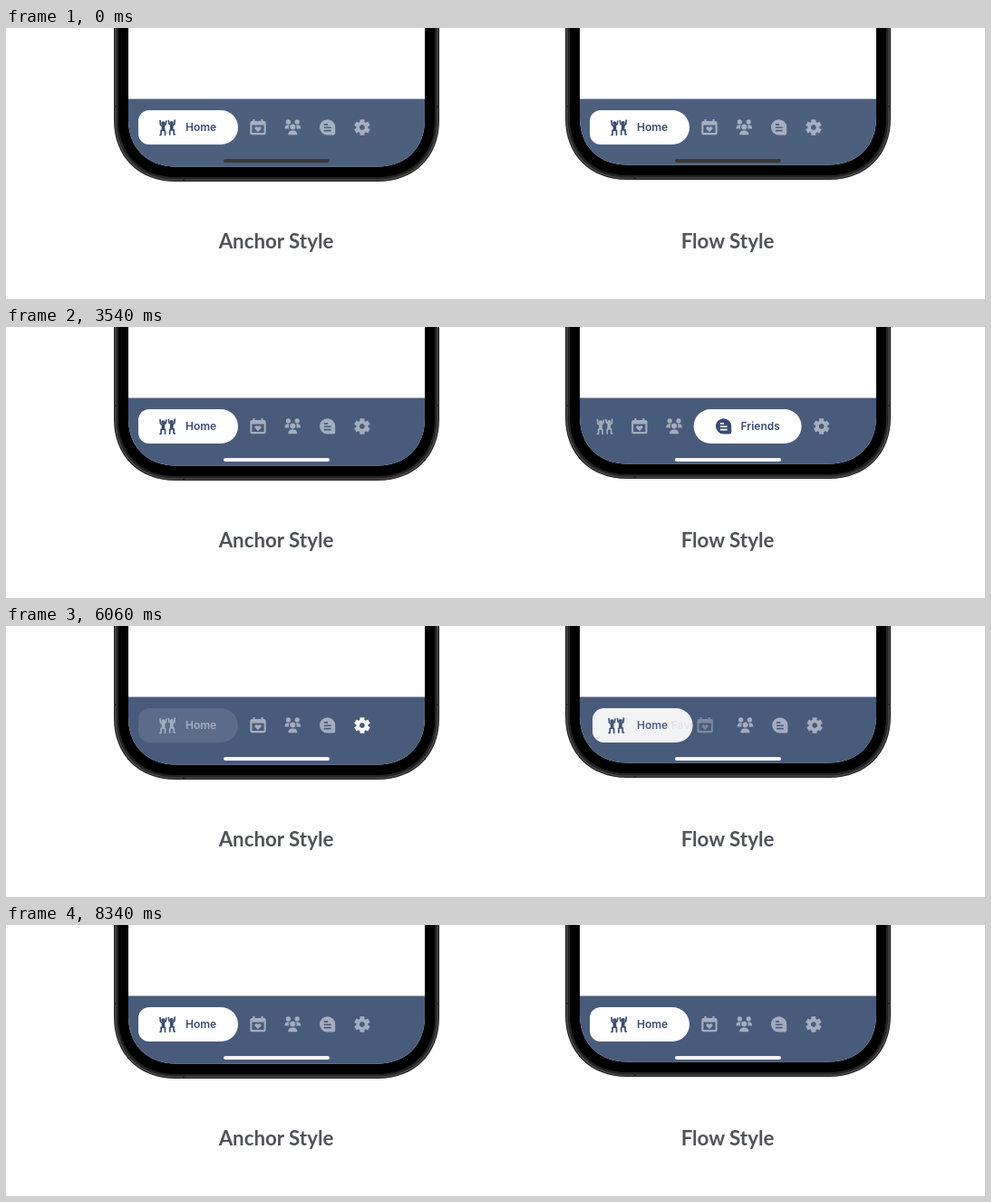
Write an HTML page that moves like this. It is 1080 by 300 pixels and loops after 8790 ms.

```html
<!DOCTYPE html>
<html lang="en">
<head>
<meta charset="utf-8">
<title>Tab bar styles</title>
<style>
html, body { margin: 0; width: 100%; height: 100%; overflow: hidden; background: #fff; }
svg { display: block; width: 100vw; height: 100vh; }
.label { font: 600 12px Inter, sans-serif; }
.caption { font: 700 22.3px Lato, sans-serif; fill: #50535a; text-anchor: middle; }
</style>
</head>
<body>
<svg id="stage" viewBox="0 0 1080 300"></svg>
<script>
const LOOP = 8790;
const NAMES = ['Home', 'Favorites', 'Messages', 'Friends', 'Profile'];
const PILL_WIDTHS = [110, 126, 133, 119, 113];
const STEP = 38.3;
const DARK = [57, 75, 112], LIGHT = [164, 174, 192];

const spokes = [0, 60, 120].map(a =>
  `<path d="M0-8.7V8.7" stroke-width="5" transform="rotate(${a})"/>`).join('');
const dancer = `<g fill="none" stroke="currentColor" stroke-width="1.7" stroke-linecap="round" stroke-linejoin="round">
  <path d="M-8-7.5L-7.6-3L-5-1.5L-1.8-3.5L-1.2-7"/><path d="M-7 3.5L-4.5 2.5L-2.5 4V8.3M-6.8 3.5L-7 8.2L-8 8.3"/></g>
  <path d="M-6.6-2H-2.8L-2.6 4H-6Z"/><circle cx="-4.6" cy="-4.7" r="2"/>`;
const ICONS = [
  `${dancer}<g transform="translate(.2 -.4) scale(-1 1)">${dancer}</g>`,
  `<path fill-rule="evenodd" d="M-5.5-9h2v2h7v-2h2v2H6.5a2.2 2.2 0 0 1 2.2 2.2V6a2.2 2.2 0 0 1-2.2 2.2H-6.5A2.2 2.2 0 0 1-8.7 6V-4.8A2.2 2.2 0 0 1-6.5-7h1ZM-6.6-2.6V6H6.6V-2.6Z"/>
   <path d="M0 5.2L-3.4 1.8C-4.6 0-1.8-2.2 0 .2C1.8-2.2 4.6 0 3.4 1.8Z"/>`,
  `<circle cx="-4.9" cy="-6.1" r="2.6"/><circle cx="4.9" cy="-6.1" r="2.6"/><circle cy="-.6" r="3"/>
   <path d="M-8.8 1.6C-8.8-1.4-7.5-2.7-5-2.7L-3.6-2.4C-4.6-.8-4.5.5-3.7 1.6ZM8.8 1.6C8.8-1.4 7.5-2.7 5-2.7L3.6-2.4C4.6-.8 4.5.5 3.7 1.6ZM-5 8.2C-5 4.8-3 3.4 0 3.4S5 4.8 5 8.2Z"/>`,
  `<path fill-rule="evenodd" d="M0-8.7A8.6 8.6 0 0 1 8.6-.1V6.7A1.8 1.8 0 0 1 6.8 8.5H0A8.6 8.6 0 0 1 0-8.7ZM-3.8-4V-2.3H.4V-4ZM-3.8-.6V1.1H4V-.6ZM-3.8 2.8V4.5H4V2.8Z"/>`,
  `<path fill-rule="evenodd" d="M0-6.6A6.6 6.6 0 0 1 0 6.6A6.6 6.6 0 0 1 0-6.6ZM0-3A3 3 0 0 0 0 3A3 3 0 0 0 0-3Z"/>
   <g stroke="currentColor" mask="url(#hub)">${spokes}</g>`
];

const clamp = v => Math.max(0, Math.min(1, v));
const lerp = (a, b, p) => a + (b - a) * p;
const mix = (a, b, p) => `rgb(${a.map((v, i) => Math.round(lerp(v, b[i], p)))})`;
const set = (el, attrs) => { for (const k in attrs) el.setAttribute(k, attrs[k]); };
const stage = document.getElementById('stage');

// Rounded rectangle open at the top, with bottom corners only
const tray = (l, r, top, bottom, rad) =>
  `M${l} ${top}V${bottom - rad}C${l} ${bottom - rad * .4} ${l + rad * .4} ${bottom} ${l + rad} ${bottom}` +
  `H${r - rad}C${r - rad * .4} ${bottom} ${r} ${bottom - rad * .4} ${r} ${bottom - rad}V${top}Z`;

const iconSet = layer => ICONS.map((d, i) => `<g data-${layer}="${i}" fill="currentColor">${d}</g>`).join('');

function phone(id, x, bottom, caption) {
  return `<g id="${id}">
    <path d="${tray(x - 16, x + 343, -10, bottom, 68)}" fill="#1b1b1c"/>
    <path d="${tray(x - 15, x + 342, -10, bottom - 1, 67)}" fill="#4a4a4b"/>
    <path d="${tray(x - 13.4, x + 340.4, -10, bottom - 2.6, 65.5)}" fill="#232324"/>
    <path d="${tray(x - 11, x + 338, -10, bottom - 5, 63)}"/>
    <path d="M${x - 16} 87h4M${x + 339} 87h4M${x + 61} ${bottom - 4}v3" stroke="#2a2a2b" stroke-width="2"/>
    <path d="${tray(x, x + 327, -10, bottom - 16.5, 52)}" fill="#fff"/>
    <path data-bar d="${tray(x, x + 327, 78.5, bottom - 16.5, 52)}"/>
    <rect data-indicator x="${x + 105}" y="145" width="117" height="4" rx="2"/>
    <g transform="translate(${x} 110)">
      ${iconSet('under')}
      <path data-pill fill="#fff"/>
      ${iconSet('over')}
      ${NAMES.map((n, i) => `<text class="label" data-label="${i}" x="${layout(i).left + 52}" y="4.3">${n}</text>`).join('')}
    </g></g>
    <text class="caption" x="${x + 163}" y="244">${caption}</text>`;
}

// Pill edges and icon centres while one tab is expanded
function layout(sel) {
  const left = sel ? 49 + STEP * (sel - 1) : 11;
  const width = PILL_WIDTHS[sel];
  const xs = NAMES.map((_, i) =>
    i < sel ? 27.5 + STEP * i :
    i === sel ? left + (sel ? 33 : 32) :
    left + width + 22 + STEP * (i - sel - 1));
  return { left, width, xs, radius: sel ? 19 : 12 };
}

function pillPath(l, w, rl) {
  const r = l + w;
  return `M${l + rl}-19H${r - 19}A19 19 0 0 1 ${r - 19} 19H${l + rl}A${rl} ${rl} 0 0 1 ${l} ${19 - rl}V${rl - 19}A${rl} ${rl} 0 0 1 ${l + rl}-19Z`;
}

stage.innerHTML = `<mask id="hub"><rect x="-12" y="-12" width="24" height="24" fill="#fff"/><circle r="3" fill="#000"/></mask>` +
  phone('anchor', 135, 170, 'Anchor Style') + phone('flow', 633, 168, 'Flow Style');

function parts(id) {
  const root = document.getElementById(id);
  const all = name => [...root.querySelectorAll(`[data-${name}]`)];
  return { under: all('under'), over: all('over'), labels: all('label'), pill: all('pill')[0] };
}
const anchor = parts('anchor'), flow = parts('flow');
const bars = stage.querySelectorAll('[data-bar]');
const indicators = stage.querySelectorAll('[data-indicator]');

// [time, tab]
const ANCHOR_TAPS = [[-999, 0], [1160, 1], [1900, 2], [2355, 3], [3200, 0], [4404, 1], [5000, 2], [5600, 4], [6600, 0]];
const FLOW_TAPS = [[-999, 0], [1290, 1], [2344, 2], [2950, 3], [3800, 4], [4426, 3], [5300, 1], [5735, 0], [6400, 2], [6680, 3], [7072, 0]];

function current(taps, t) {
  let i = taps.length - 1;
  while (taps[i][0] > t) i--;
  return { age: t - taps[i][0], to: taps[i][1], from: taps[Math.max(0, i - 1)][1] };
}

const placeIcon = (el, x, color, opacity) => set(el, { transform: `translate(${x} 0)`, color, opacity });

function drawAnchor(t) {
  const { age, to, from } = current(ANCHOR_TAPS, t);
  const q = clamp(age / 300);
  const home = layout(0);
  const on = to === 0 ? q : from === 0 ? 1 - q : 0;
  const ink = mix(LIGHT, DARK, on);
  set(anchor.pill, { d: pillPath(home.left, home.width, home.radius), 'fill-opacity': lerp(.1, 1, on) });
  NAMES.forEach((_, i) => {
    let alpha = .5;
    if (i === to) alpha = q < .13 ? .5 * (1 - q / .13) : (q - .13) / .87;
    else if (i === from) alpha = lerp(1, .5, q);
    placeIcon(anchor.under[i], home.xs[i], '#fff', i ? alpha : 0);
    placeIcon(anchor.over[i], home.xs[i], ink, i ? 0 : 1);
    set(anchor.labels[i], { fill: ink, opacity: i ? 0 : 1 });
  });
}

function drawFlow(t) {
  const { age, to, from } = current(FLOW_TAPS, t);
  const press = clamp(age / 120);
  const m = clamp((age - 120) / 360);
  const p = 1 - (1 - m) ** 3;
  const a = layout(from), b = layout(to);
  const alpha = m > 0 ? .45 + .55 * clamp(m / .6) ** 3 : 1 - .55 * press;
  const ink = mix(LIGHT, DARK, alpha);
  const inside = m > 0 ? to : from;
  set(flow.pill, {
    d: pillPath(lerp(a.left, b.left, p), lerp(a.width, b.width, Math.sqrt(p)), lerp(a.radius, b.radius, p)),
    'fill-opacity': alpha
  });
  NAMES.forEach((_, i) => {
    const x = lerp(a.xs[i], b.xs[i], i === to ? p ** 2.5 : p);
    const dim = i === to ? 1 - press * .7 : i === from ? m : 1;
    placeIcon(flow.under[i], x, '#fff', i === inside ? 0 : .5 * dim);
    placeIcon(flow.over[i], x, ink, i === inside ? 1 : 0);
    set(flow.labels[i], { fill: ink, opacity: i === to ? p : i === from ? 1 - p : 0 });
  });
}

const INDICATOR = [[0, [57, 55, 54]], [780, [94, 91, 90]], [1260, [133, 129, 128]], [2610, [236, 233, 240]], [2700, [245, 243, 249]], [LOOP, [245, 243, 249]]];

function drawShared(t) {
  const k = INDICATOR.findIndex(s => s[0] > t);
  const [t0, c0] = INDICATOR[k - 1], [t1, c1] = INDICATOR[k];
  const tint = mix(c0, c1, (t - t0) / (t1 - t0));
  const bar = mix([76, 96, 126], [72, 91, 123], clamp(t / 780));
  bars.forEach(el => set(el, { fill: bar }));
  indicators.forEach(el => set(el, { fill: tint }));
}

function frame(now) {
  const t = now % LOOP;
  drawShared(t);
  drawAnchor(t);
  drawFlow(t);
}

const start = performance.now();
function tick() {
  frame(performance.now() - start);
  requestAnimationFrame(tick);
}
tick();
</script>
</body>
</html>
```
